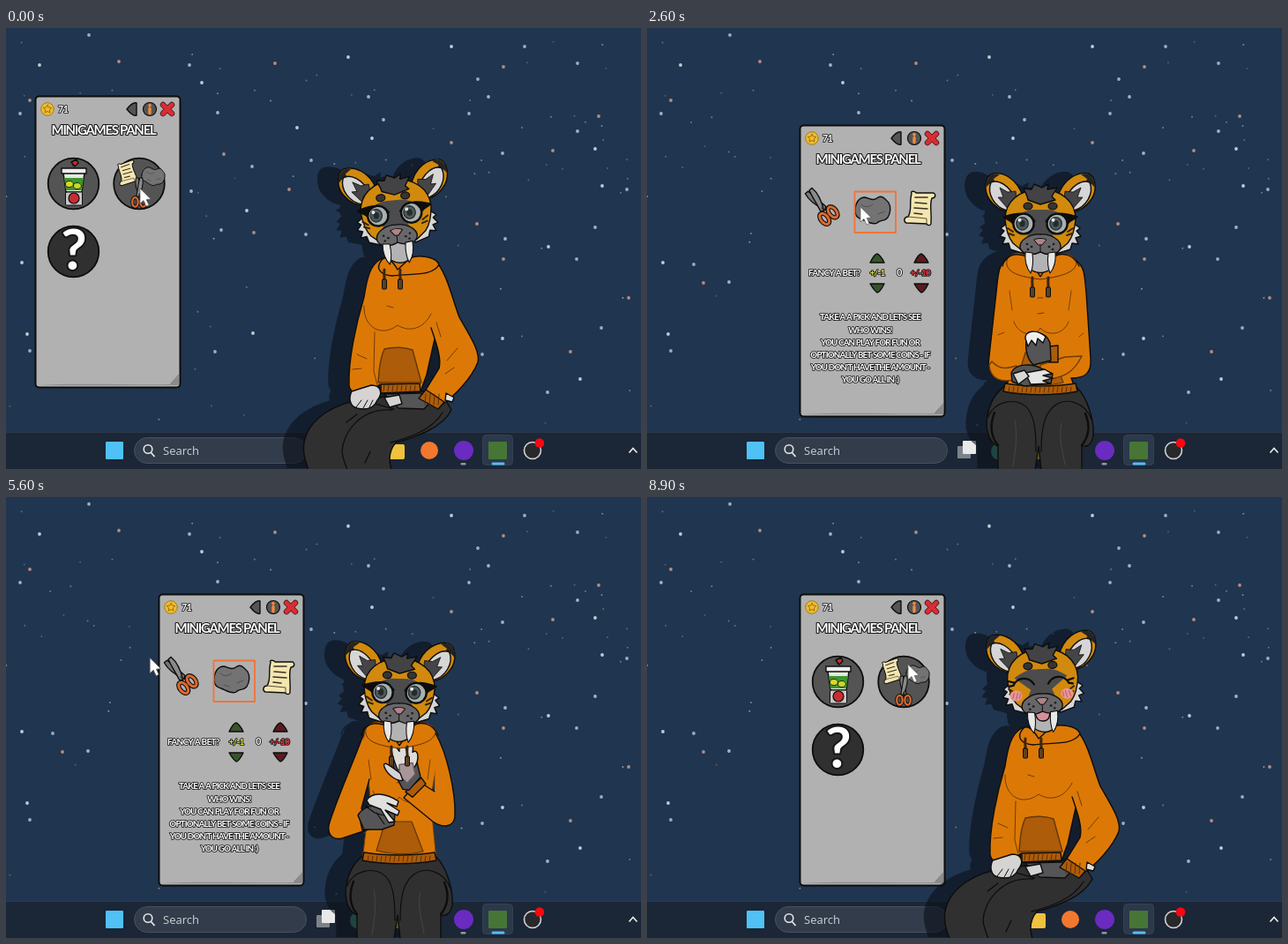
Animation of 720x500 px, one loop 9000 ms. Source, as an HTML page with a canvas:

```html
<!DOCTYPE html>
<html lang="en">
<head>
<meta charset="utf-8">
<title>Desktop companion</title>
<style>
html, body { margin: 0; width: 100%; height: 100%; overflow: hidden; background: #20354f; }
canvas { display: block; width: 720px; height: 500px; }
</style>
</head>
<body>
<canvas id="stage" width="720" height="500"></canvas>
<script>
const LOOP = 9000, STEP = 100;
const INK = '#0d0d0d', ORANGE = '#dc7906', DARK_ORANGE = '#ad5c09', FUR = '#d18a0d';
const PANTS = '#303030', WHITE_FUR = '#d6d6d6', GREY_FUR = '#555557';

const screen = document.getElementById('stage').getContext('2d');
const layer = () => {
  const el = document.createElement('canvas');
  el.width = 720; el.height = 500;
  return el.getContext('2d');
};
const backdrop = layer(), actor = layer();
let c = screen;

// ---------- helpers ----------
function shape(d, fill, stroke = INK, width = 1.4) {
  const p = new Path2D(d);
  if (fill) { c.fillStyle = fill; c.fill(p); }
  if (stroke) { c.strokeStyle = stroke; c.lineWidth = width; c.stroke(p); }
}
const line = (d, color = INK, width = 1) => shape(d, null, color, width);

function oval(x, y, rx, ry, fill, stroke, width = 1.2) {
  c.beginPath();
  c.ellipse(x, y, rx, ry, 0, 0, Math.PI * 2);
  if (fill) { c.fillStyle = fill; c.fill(); }
  if (stroke) { c.strokeStyle = stroke; c.lineWidth = width; c.stroke(); }
}

function box(x, y, w, h, r, fill, stroke, width = 1) {
  c.beginPath();
  c.roundRect(x, y, w, h, r);
  if (fill) { c.fillStyle = fill; c.fill(); }
  if (stroke) { c.strokeStyle = stroke; c.lineWidth = width; c.stroke(); }
}

function at(x, y, rot, scale, draw) {
  c.save();
  c.translate(x, y);
  c.rotate(rot);
  c.scale(scale, scale);
  draw();
  c.restore();
}

function both(draw) {
  draw();
  c.save();
  c.scale(-1, 1);
  draw();
  c.restore();
}

function label(text, x, y, size, color = '#fff', align = 'center', gap = -0.7, edge = 1.7) {
  c.font = `bold ${size}px Lato, "Open Sans", sans-serif`;
  c.letterSpacing = gap + 'px';
  c.textAlign = align;
  c.textBaseline = 'middle';
  c.lineJoin = 'round';
  c.lineWidth = edge;
  c.strokeStyle = '#161616';
  c.strokeText(text, x, y);
  c.fillStyle = color;
  c.fillText(text, x, y);
  c.letterSpacing = '0px';
}

// Linear interpolation over rows of [time, ...values]
function track(rows, t) {
  let i = 0;
  while (i < rows.length - 2 && t >= rows[i + 1][0]) i++;
  const a = rows[i], b = rows[i + 1];
  const k = Math.max(0, Math.min(1, (t - a[0]) / (b[0] - a[0])));
  return a.slice(1).map((v, n) => v + (b[n + 1] - v) * k);
}

// ---------- desktop ----------
function paintBackdrop() {
  c = backdrop;
  c.fillStyle = '#20354f';
  c.fillRect(0, 0, 720, 500);
  let seed = 41;
  const rnd = () => (seed = (seed * 16807) % 2147483647) / 2147483647;
  const tints = ['#e8edf2', '#c2d0de', '#d5a08c', '#b9c7e0'];
  for (let i = 0; i < 80; i++) {
    const x = rnd() * 720;
    const y = i < 40 ? 150 + (rnd() + rnd() - 1) * 110 : rnd() * 455;
    c.globalAlpha = 0.25 + rnd() * 0.3;
    oval(x, y, 1, 1, tints[i % 4]);
  }
  const bright = [38,42, 94,8, 305,40, 411,78, 388,33, 535,58, 564,44, 547,78, 505,21, 648,40,
    672,100, 648,117, 668,137, 588,21, 27,82, 16,97, 18,266, 53,268, 64,289, 93,288, 24,347,
    27,366, 128,38, 208,42, 222,62, 279,157, 321,183, 210,185, 330,113, 346,150, 247,143,
    240,96, 273,207, 244,229, 281,232, 340,234, 280,346, 237,367, 564,262, 566,239, 615,248,
    647,262, 534,222, 668,226, 676,179, 704,183, 620,139, 563,142, 563,352, 540,370, 640,367,
    614,413, 651,398, 675,340, 706,306, 428,104, 415,125, 525,97, 505,130];
  for (let i = 0; i < bright.length; i += 2) {
    c.globalAlpha = 0.82;
    oval(bright[i], bright[i + 1], 1.9, 1.9, tints[(i * 3 / 2) % 4]);
  }
  c.globalAlpha = 1;
  paintTaskbar();
}

function paintTaskbar() {
  c.fillStyle = '#1b2636';
  c.fillRect(0, 458, 720, 42);
  c.fillStyle = '#2c384a';
  c.fillRect(0, 458, 720, 1);
  box(113, 469, 20, 20, 1, '#4fc1f5');
  box(145.5, 464.5, 195, 29, 14.5, '#323c4b', '#47505e');
  oval(161, 477.5, 4.8, 4.8, null, '#e4e6e9', 1.6);
  line('M164.5,481.5 L168.5,486', '#e4e6e9', 1.8);
  c.font = '13px "Open Sans", "Noto Sans", sans-serif';
  c.textAlign = 'left';
  c.textBaseline = 'alphabetic';
  c.fillStyle = '#cdd1d6';
  c.fillText('Search', 178, 484);
  box(352, 474, 15, 14, 1, '#7d828a');
  box(358, 468, 15, 15, 1, '#e9e9e9');
  oval(400, 480, 10, 10, '#3f8f78');
  box(432, 472, 20, 17, 2, '#efc23e');
  oval(480, 479, 10, 10, '#f2782f');
  oval(519, 479, 11, 11, '#6a2bc0');
  box(515.5, 493, 6, 2.5, 1.2, '#8e98a5');
  box(540.5, 461.5, 34, 34, 4, '#2b394b', '#344255');
  box(547, 469, 21, 20, 1, '#477536');
  box(550.5, 492.5, 15, 3, 1.5, '#53bdf3');
  oval(597, 479, 9.5, 9.5, '#29292c', '#d2d3d5', 1.6);
  oval(605, 470.5, 5.3, 5.3, '#fa0710');
  line('M706.5,481.5 L711,476.5 L715.5,481.5', '#e8e8e8', 1.7);
}

// ---------- panel ----------
const rock = () => {
  shape('M-20,1 C-20,-7 -16,-14 -9,-14 C-3,-13 0,-9 6,-14 C11,-17 15,-11 18,-8 C21,-3 20,4 17,9 C13,14 8,11 5,15 C0,18 -7,13 -12,11 C-17,10 -20,7 -20,1Z', '#737373');
  line('M-13,-6 C-9,-2 -4,-3 0,-6 M6,5 L13,2 M-9,7 L-3,9', '#505050');
};

const scroll = () => {
  shape('M-9,-17 C-11,-21 -5,-20 -4,-18 L16,-18 C19,-16 18,-12 14,-12 C11,-4 14,4 13,15 C14,20 8,19 8,17 L-15,16 C-19,14 -17,9 -13,9 C-8,2 -12,-8 -9,-17Z', '#f4e6b0');
  line('M-5,-13 L9,-13 M-5,-7 L8,-6 M-6,-1 L9,0 M-6,5 L3,6', '#383020', 1.6);
  line('M-13,9 L8,11 L8,17', '#5d5033');
};

const scissors = () => {
  shape('M-5,-25 C-7,-15 -3,-4 1,4 L4,1 C2,-8 1,-19 -1,-25Z', '#777');
  shape('M5,-25 C7,-15 3,-4 -1,4 L-4,1 C-2,-8 -1,-19 1,-25Z', '#8a8a8a');
  for (const [color, width] of [[INK, 5.2], ['#dd692e', 3]])
    both(() => oval(6, 11, 4.2, 7, null, color, width));
  oval(0, 0, 1.4, 1.4, '#333');
};

function star(x, y, r) {
  c.beginPath();
  for (let i = 0; i < 10; i++) {
    const a = -Math.PI / 2 + i * Math.PI / 5, d = i % 2 ? r * 0.5 : r;
    c.lineTo(x + Math.cos(a) * d, y + Math.sin(a) * d);
  }
  c.closePath();
  c.lineWidth = 1;
  c.strokeStyle = '#a36d09';
  c.stroke();
}

function drawMenu() {
  for (const [x, y, col] of [[43.5, 99.5, '#545454'], [118, 99.5, '#545454'], [43.5, 176.5, '#303030']])
    oval(x, y, 28.8, 28.8, col, INK, 1.8);
  at(44, 100, 0, 1, () => {
    line('M-1,-21 L2,-27', '#333', 2);
    shape('M-3,-25 L3,-28 L5,-24 L1,-20Z', '#c92b31');
    shape('M-12,-13 L12,-13 L9,9 L-9,9Z', '#e0eadb');
    shape('M-14,-18 L14,-18 L14,-12 L-14,-12Z', '#ededed');
    shape('M-11,-7 L11,-7 L9,7 L-9,7Z', '#3f9432', null);
    oval(-5, 0, 4.5, 3.5, '#d9d928', INK, 0.8);
    oval(4, 2, 4.5, 3.5, '#c3dc28', INK, 0.8);
    box(-9.5, 9, 19, 15, 1, '#c7c7c7', INK);
    oval(0, 16, 6, 6, '#c72e32', INK);
  });
  at(104, 88, -0.35, 0.68, scroll);
  at(134, 91, 0.15, 0.66, rock);
  at(118, 112, 0, 0.76, scissors);
  label('?', 44, 177, 64, '#fff', 'center', 0, 4);
}

const RULES = ["TAKE A A PICK AND LET'S SEE", 'WHO WINS!', 'YOU CAN PLAY FOR FUN OR',
  'OPTIONALLY BET SOME COINS - IF', "YOU DON'T HAVE THE AMOUNT -", 'YOU GO ALL IN :)'];

function drawGame(picked) {
  at(26, 94, -0.68, 1, scissors);
  at(83, 96, 0, 1, rock);
  at(136, 95, 0, 1, scroll);
  if (picked) box(62.5, 75.5, 46.5, 46.5, 0, null, '#f27338', 1.8);
  label('FANCY A BET?', 10, 167.5, 10, '#fff', 'left', -0.75);
  label('+/-1', 88, 167.5, 10, '#e5ed35');
  label('0', 113, 167.5, 10.5);
  label('+/-10', 137, 167.5, 10, '#f03338');
  for (const [x, col] of [[88, '#36542a'], [138, '#5a1b1f']]) {
    shape(`M${x - 8},156 C${x - 5},150 ${x - 2},146 ${x},146 C${x + 3},147 ${x + 6},152 ${x + 8},156Z`, col);
    shape(`M${x - 8},180 L${x + 8},180 C${x + 5},186 ${x + 2},190 ${x},190 C${x - 3},188 ${x - 5},185 ${x - 8},180Z`, col);
  }
  RULES.forEach((s, i) => label(s, 80, 218.5 + i * 14.2, 9.8, '#fff', 'center', -0.85));
}

function drawPanel(x, y, game, picked) {
  at(x, y, 0, 1, () => {
    box(0.5, 0.5, 164, 330, 4, '#b1b1b1', INK, 2);
    shape('M3,328 C50,325 110,328 153,327 L163,317 L163,328Z', '#8b8b8b', null);
    line('M154,326 L163,316', '#777');
    oval(14, 15, 7.3, 7.3, '#edbd31', '#a37d1c', 1);
    star(14, 15, 5);
    label('71', 26, 15.5, 10.5, '#fff', 'left', -0.4);
    shape('M104,15 C108,10 112,7 115,8 L115,22 C112,23 108,20 104,15Z', '#555');
    oval(130, 15, 7.5, 7.5, '#555', INK);
    line('M130,14.5 L130,19.5 M130,10.5 L130,11', '#ef8a3d', 3.4);
    line('M145,10 L155,20 M155,10 L145,20', '#4d1517', 6.4);
    line('M145,10 L155,20 M155,10 L145,20', '#d92d34', 4.8);
    label('MINIGAMES PANEL', 77.5, 39.5, 15, '#fff', 'center', -1.3, 2.2);
    game ? drawGame(picked) : drawMenu();
  });
}

// ---------- character ----------
function drawHead({ x, y, rot, happy, shift = 0, look }) {
  at(x, y, rot, 1, () => {
    both(() => {
      shape('M-20,-34 C-26,-54 -42,-62 -54,-60 C-64,-57 -64,-40 -58,-31 C-52,-22 -44,-17 -34,-16Z', FUR);
      shape('M-62,-44 C-62,-56 -55,-62 -46,-59 L-53,-54 L-51,-49 L-58,-48Z', '#242424', null);
      shape('M-28,-31 C-35,-46 -47,-54 -56,-50 C-61,-37 -52,-22 -38,-18Z', WHITE_FUR);
      shape('M-36,-19 L-48,-33 L-42,-33 L-46,-44 L-37,-39 L-28,-40 L-26,-22Z', '#454547', INK, 0.8);
      shape('M-37,-4 L-45,2 L-41,5 L-46,11 L-40,13 L-43,20 L-36,19 L-34,26 L-18,31 L-18,0Z', WHITE_FUR);
    });
    shape('M-12,28 L-12,48 C-4,54 4,54 12,48 L12,28Z', '#b3b3b5');
    shape('M0,-42 C-24,-42 -40,-28 -40,-8 C-39,4 -35,14 -31,19 L-20,28 L20,28 L31,19 C35,14 39,4 40,-8 C40,-28 24,-42 0,-42Z', FUR);
    shape('M-15,-34 L-19,-43 L-10,-42 L-7,-48 L2,-44 L9,-48 L8,-42 L19,-44 L13,-34 L17,-30 L0,-25 L-14,-30Z', '#434345');
    at(shift, 0, 0, 1, () => {
      shape('M-9,-19 C-16,-18 -22,-16 -30,-10 L-12,4 L-17,16 L17,16 L12,4 L30,-10 C22,-16 16,-18 9,-19Z', '#4c4c4e', null);
      both(() => {
        oval(-14, -23, 5, 4, '#343436', INK);
        line('M-37,2 L-31,6 M-36,8 L-30,10', '#332507', 2);
        if (happy) {
          line('M-31,-3 C-25,-12 -13,-11 -8,-2 M-30,-5 L-37,-7 M-31,-2 L-36,-1', INK, 2.2);
          oval(-29, 10, 7, 6, '#e99595');
          line('M-33,13 L-31,7 M-29,14 L-27,7 M-25,13 L-24,8', '#b85b61');
        } else {
          shape('M-30,-2 C-34,-8 -39,-7 -42,-11 C-34,-13 -18,-21 -6,-6Z', INK);
          oval(-19, -3, 11.6, 11.4, '#a8b1b2', INK, 2.4);
        }
      });
      if (!happy) for (const ex of [-19, 19]) {
        oval(ex + look[0], -3 + look[1], 6.7, 7.2, '#505a5c', '#2a3031', 1.4);
        oval(ex + look[0], -3 + look[1], 3.2, 3.8, '#252a2b');
        oval(ex + look[0] - 3, -7 + look[1], 2, 2, '#e3e8e8');
      }
      if (happy) shape('M-8,27 C-9,37 -4,40 0,40 C6,40 9,36 8,27Z', '#d78e99');
      shape('M0,9 C-11,8 -24,15 -23,24 C-21,33 -8,33 0,29 C8,33 21,33 23,24 C24,15 11,8 0,9Z', '#67676a');
      shape('M-7,15 C-3,13 3,13 7,15 L2,21 L-2,21Z', '#b08389', INK, 1);
      line('M0,21 L0,29');
      both(() => {
        oval(-10, 23, 1.5, 1.2, '#1b1b1b');
        oval(-15, 20, 1.4, 1.2, '#1b1b1b');
        oval(-14, 26, 1.4, 1.2, '#1b1b1b');
        shape('M-17,29 C-18,40 -15,48 -11,53 C-8,46 -8,38 -9,30Z', '#e7e7e5', INK, 1.1);
      });
    });
  });
}

function strings(x, y) {
  for (const s of [-9, 9]) {
    line(`M${x + s},${y} C${x + s - 1},${y + 8} ${x + s + 1},${y + 12} ${x + s},${y + 15}`, '#3c2511', 3);
    box(x + s - 2.5, y + 11, 5, 11, 1, '#5d4024', INK);
  }
}

function ribs(x1, x2, y, h) {
  for (let x = x1; x < x2; x += 5) line(`M${x},${y} L${x - 1},${y + h}`, '#542b04', 0.9);
}

function frontLegs() {
  shape('M404,407 L487,407 C500,420 507,445 506,462 C504,474 497,476 493,473 L493,501 L447,501 L444,474 L440,501 L398,501 L398,474 C388,470 383,455 386,440 C388,425 396,414 404,407Z', PANTS);
  line('M387,441 C393,423 420,417 432,432 C440,442 441,460 441,480 M504,444 C497,424 474,417 460,430 C449,440 447,459 447,480', INK, 1.2);
  line('M398,473 C389,462 389,449 394,436 M493,473 C502,462 502,449 497,437', INK, 2.4);
  line('M417,445 C420,461 418,480 415,496 M470,448 C466,465 472,482 474,495', '#454545');
}

function waist() {
  shape('M406,403 C430,407 462,407 486,403 L488,412 C462,417 430,417 404,412Z', DARK_ORANGE);
  ribs(411, 486, 407, 6);
}

const pocket = (x, y) =>
  shape(`M${x - 17},${y - 18} L${x + 13},${y - 18} L${x + 26},${y + 16} C${x + 10},${y + 20} ${x - 10},${y + 19} ${x - 27},${y + 15}Z`, DARK_ORANGE, '#633608', 1.2);

function folds() {
  line('M416,333 C422,350 441,350 446,340 C454,350 473,348 478,333 M443,306 L449,306 M443,324 L450,323', '#713c06');
  line('M411,298 L414,320 M481,298 L478,320 M398,348 L405,345 M490,350 L495,346', '#713c06', 0.9);
}

const collar = () => {
  shape('M408,263 C414,253 426,253 432,260 L446,282 L461,260 C470,253 481,255 487,265 C487,278 467,282 446,285 C424,282 405,278 408,263Z', ORANGE, '#5f3206', 1);
  line('M403,270 C406,258 418,253 432,260 L446,282 L461,260 C470,253 484,257 490,270', INK, 1.3);
};

function foldedBody() {
  shape('M408,262 C398,268 398,282 396,300 L388,372 C385,392 392,399 410,399 L405,412 C430,416 460,416 487,412 L481,397 C498,397 504,390 503,375 L498,300 C496,282 497,272 487,264Z', ORANGE);
  folds();
  waist();
  pocket(446, 386);
  shape('M493,372 C484,390 473,398 446,399 L446,382 L474,373Z', ORANGE, '#713c06');
  shape('M391,378 C400,388 409,386 419,383 L419,398 C402,403 389,398 388,382Z', ORANGE, '#713c06');
  shape('M456,361 L466,360 L466,379 L456,379Z', DARK_ORANGE);
  shape('M431,351 C434,342 452,343 457,357 L458,377 L438,382 C430,374 428,361 431,351Z', GREY_FUR);
  shape('M429,352 C428,343 442,341 452,350 L449,357 L443,352 L441,360 L436,354 L432,361Z', '#efefed');
  shape('M413,391 C417,380 437,380 447,386 L460,392 L458,403 L428,406 L414,401Z', GREY_FUR);
  shape('M429,391 L451,387 L459,392 L449,394 L460,397 L449,400 L457,403 L435,404Z', '#e4e4e2');
  shape('M415,392 L428,388 L433,395 L421,404Z', '#d7d7d5');
  collar();
  strings(446, 283);
}

function playBody(bob) {
  shape('M408,262 C399,285 415,320 412,345 L404,412 C430,416 460,416 488,412 L482,350 C482,320 497,286 487,264Z', ORANGE, '#713c06', 1);
  folds();
  waist();
  pocket(447, 386);
  shape('M405,270 C394,300 374,345 366,372 C364,386 374,390 384,386 L411,377 L403,353 L412,320', ORANGE);
  shape('M487,268 C500,290 510,335 509,362 C508,374 496,376 484,368 L451,341 L467,322 L486,334', ORANGE);
  shape('M400,359 L411,355 L417,374 L404,378Z', DARK_ORANGE);
  shape('M399,361 C408,345 431,349 441,358 L440,372 L426,377 L406,377Z', GREY_FUR);
  shape('M409,344 C415,334 430,335 445,345 L443,351 L432,347 L446,356 L444,361 L430,355 L441,368 L434,369 L425,354 L412,349Z', '#e0e0de');
  line('M407,350 L418,358 L428,361 M420,358 L429,371', INK, 1.2);
  c.save();
  c.translate(0, bob);
  shape('M453,337 L471,321 L476,328 L461,343Z', DARK_ORANGE);
  shape('M450,334 L441,317 L438,299 L464,295 L470,320 L457,335Z', GREY_FUR);
  shape('M444,312 C439,299 434,286 440,283 L446,291 C445,278 451,279 454,290 C456,279 463,281 461,292 C468,287 469,301 463,309Z', '#deddda');
  shape('M446,306 L461,304 L464,317 L455,327 L446,319Z', '#aa9699', '#665c5e');
  shape('M447,316 C439,310 426,299 429,309 C433,319 444,325 450,324Z', '#d5d4d2');
  c.restore();
  collar();
  strings(446, 283);
}

function vHand(x, y, rot) {
  at(x, y, rot, 1.12, () => {
    shape('M-9,4 L9,4 L9,17 L-8,17Z', '#4d4d50');
    shape('M-15,-1 C-12,-8 -7,-8 -5,-5 L-13,-20 C-13,-27 -7,-27 -5,-21 L0,-9 L5,-22 C8,-28 13,-24 11,-18 L7,-5 C17,-8 19,1 13,7 C6,12 -8,13 -14,6Z', '#d5d4d2');
    shape('M-7,0 C-4,-5 3,-5 5,0 C7,6 0,9 -5,7Z', '#8f7b7f', null);
    line('M-10,-20 L-8,-13 M8,-20 L6,-13', '#ad9195', 3);
    line('M-12,5 C-8,1 -3,5 -3,8 M9,6 C5,3 3,5 3,8', INK);
  });
}

function peaceBody(k) {
  const w = 4 * k;
  shape('M447,262 C438,280 436,305 430,327 C427,354 413,381 404,411 C430,416 462,416 489,411 L488,370 C498,344 509,315 508,280 L500,263Z', ORANGE);
  line('M430,318 C437,342 460,344 467,334 C477,349 495,341 499,322 M466,315 L474,314 M438,290 L444,306', '#713c06');
  waist();
  pocket(450, 379);
  vHand(384 + k * 2, 250, -0.18);
  shape('M448,261 C434,267 424,286 402,309 L404,280 L376,276 C372,300 368,325 371,340 C376,351 390,355 402,348 C418,337 430,319 437,302', ORANGE);
  shape('M379,266 L400,268 L404,280 L376,277Z', DARK_ORANGE);
  ribs(382, 402, 268, 10);
  vHand(528 - w, 280 - k * 9, 0.22);
  const ty = 312 - k * 13;
  shape(`M502,283 C506,293 506,304 510,${ty} L${537 - w},${ty} C${536 + w},335 ${536 + w},352 ${533 + w * 1.6},367 C527,384 510,385 504,376 C499,366 498,350 490,339`, ORANGE);
  shape(`M${512 - w},${ty - 11} L${535 - w},${ty - 13} L${538 - w},${ty} L${510 - w},${ty}Z`, DARK_ORANGE);
  ribs(514 - w, 537 - w, ty - 10, 9);
  shape('M447,263 C452,249 465,251 470,258 L482,280 L496,260 C508,260 515,274 507,284 C495,290 481,278 474,280 C463,281 449,277 447,263Z', ORANGE);
  strings(475, 277);
}

function sideBody() {
  shape('M409,421 C373,424 343,443 338,470 C336,482 340,492 343,501 L437,501 C433,488 436,477 442,470 C467,463 495,453 505,433 L491,409Z', PANTS);
  line('M438,433 C401,430 382,460 381,480 C382,489 385,495 387,501 M419,426 L440,432 M495,436 C483,456 458,464 436,470 M398,438 L386,447 M407,493 L413,480', INK, 1.3);
  shape('M425,262 C412,269 409,286 406,305 C397,335 388,376 389,405 C390,414 399,416 414,412 L424,404 L424,412 L470,412 L477,393 L491,330 C496,308 501,279 486,263Z', ORANGE);
  line('M406,315 C405,340 426,351 444,337 C457,345 473,342 482,324 M418,345 L417,389 L421,405 M432,315 L439,317 M393,387 L403,386 M398,370 L409,375', '#713c06');
  shape('M425,404 L469,403 L470,412 L425,414Z', DARK_ORANGE);
  ribs(429, 468, 405, 7);
  shape('M429,364 C440,361 453,362 461,365 L471,402 L422,402 C423,388 424,375 429,364Z', DARK_ORANGE, '#633608');
  shape('M392,412 L414,405 C426,405 427,415 421,422 C417,432 407,433 398,431 C390,429 388,420 392,412Z', '#d5d4d2');
  line('M397,430 L403,422 M405,431 L410,422 M412,430 L416,422');
  shape('M429,415 L470,414 L483,422 L474,432 L445,431Z', GREY_FUR);
  shape('M429,419 L446,416 L449,426 L435,430Z', '#d5d4d2');
  shape('M486,263 C500,277 505,304 514,328 C526,349 538,367 535,379 C528,397 508,418 493,428 L470,420 L491,386 C494,374 488,358 482,340', ORANGE);
  line('M488,334 L493,350 M512,363 L500,377 M508,385 L498,392', '#713c06');
  shape('M476,410 L497,424 L490,432 L468,420Z', DARK_ORANGE);
  ribs(476, 494, 415, 12);
  shape('M499,414 L508,419 L506,424 L498,422Z', '#dfdfdb');
  shape('M426,263 C431,257 439,265 444,274 L457,262 C465,256 487,259 491,268 C484,282 459,278 438,281 C425,280 418,273 426,263Z', ORANGE);
  strings(438, 274);
}

// ---------- hearts ----------
function heart(x, y, size, rot) {
  at(x, y, rot, size / 67, () =>
    shape('M0,-21 C-7,-34 -22,-35 -30,-25 C-38,-12 -31,3 -21,14 C-14,22 -6,28 1,33 C16,24 29,9 32,-8 C36,-26 25,-35 15,-33 C7,-32 2,-27 0,-21Z', '#fc7d82', '#1b1113', 1.7));
}

const HEARTS = [[5950, 448], [6350, 442], [6750, 440]];
function drawHearts(t) {
  for (const [born, x] of HEARTS) {
    const age = t - born;
    if (age < 0 || age > 2050) continue;
    const [y, size] = track([[0, 136, 4], [50, 134, 11], [450, 115, 57], [550, 109, 68], [950, 75, 68], [1350, 45, 68], [2050, -40, 68]], age);
    heart(x + age * 0.0015, y, size, 0.03 + age * 0.00005);
  }
}

// ---------- timeline ----------
const PANEL = [[1000, 33, 77], [1500, 160, 113], [1700, 173, 110]];
const POINTER = [[200, 152, 182], [900, 93, 92], [1000, 93, 92], [1500, 220, 128], [1700, 233, 125],
  [2400, 242, 203], [2900, 242, 203], [3700, 169, 189], [4500, 169, 189], [6400, 159, 178],
  [7300, 156, 162], [8000, 156, 162], [8700, 296, 190]];

function drawActor(t, pointer) {
  c = actor;
  c.clearRect(0, 0, 720, 500);
  c.lineJoin = c.lineCap = 'round';
  const look = [Math.max(-2, Math.min(2, (pointer[0] - 446) / 140)), Math.max(-2, Math.min(2, (pointer[1] - 215) / 60))];
  if (t < 500 || t >= 8200) {
    sideBody();
    const late = t >= 8200;
    const [x, y, rot] = late
      ? track([[8200, 445, 214, -0.11], [8900, 449, 214, -0.05]], t)
      : track([[0, 443, 214, -0.1], [500, 444, 215, -0.08]], t);
    drawHead({ x, y, rot, happy: late, shift: -2, look });
  } else if (t >= 5900) {
    const k = (1 - Math.cos((t - 6400) / 900 * Math.PI)) / 2;
    frontLegs();
    peaceBody(k);
    drawHead({ x: 490 - 3 * k, y: 222 - 2 * k, rot: 0.33 - 0.15 * k, happy: true, shift: 5 - 5 * k, look });
  } else {
    frontLegs();
    const play = t >= 2900;
    play ? playBody(Math.sin((t - 4500) / 260) * 3) : foldedBody();
    drawHead({ x: 446, y: 225, rot: play ? Math.sin((t - 4500) / 450) * 0.025 : 0, happy: false, look });
  }
  drawHearts(t);
}

function render(t) {
  const [px, py] = track(PANEL, t), pointer = track(POINTER, t);
  drawActor(t, pointer);
  c = screen;
  c.lineJoin = c.lineCap = 'round';
  c.drawImage(backdrop.canvas, 0, 0);
  drawPanel(px, py, t >= 300 && t < 5700, t >= 2400);
  c.save();
  c.shadowColor = 'rgba(8, 14, 23, .58)';
  c.shadowOffsetX = -23;
  c.shadowOffsetY = -1;
  c.drawImage(actor.canvas, 0, 0);
  c.restore();
  at(pointer[0], pointer[1], 0, 1, () =>
    shape('M0,0 L0,17 L4,13.5 L7,20 L10,18.7 L7.2,12.5 L12,12Z', '#fff', '#5d5d5d', 0.7));
}

paintBackdrop();
const start = performance.now();
function tick() {
  const t = (performance.now() - start) % LOOP;
  render(Math.floor(t / STEP) * STEP);
  requestAnimationFrame(tick);
}
tick();
</script>
</body>
</html>
```
